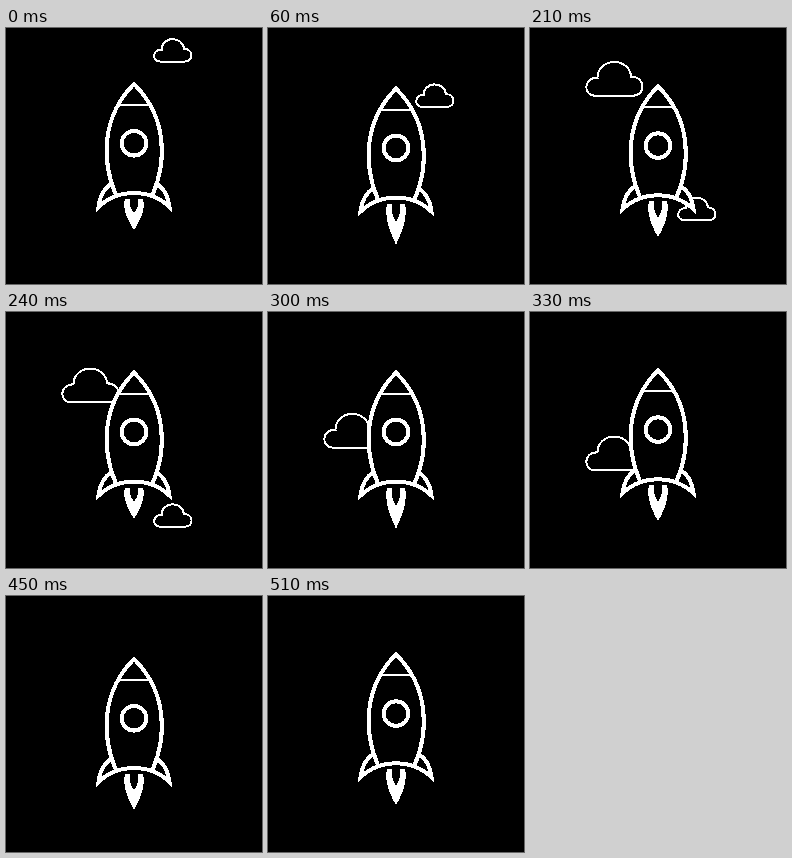
Animation of 256 by 256 pixels, one loop 540 ms. Source, as an HTML page:

```html
<!DOCTYPE html>
<html lang="en">
<head>
<meta charset="utf-8">
<title>Rocket</title>
<style>
  html, body { margin: 0; height: 100%; overflow: hidden; background: #000; }
  svg { display: block; width: 100vw; height: 100vh; fill: #000; stroke: #fff; stroke-width: 4; shape-rendering: crispEdges; }
</style>
</head>
<body>
<svg viewBox="0 0 256 256">
  <path id="near"/>
  <path id="far"/>
  <g id="rocket">
    <path id="flame" fill="#fff" stroke="none"
      d="M-9 0Q-12.5 12 0 31Q12.5 12 9 0H4.5Q5 8 0 14Q-5 8 -4.5 0Z"/>
    <path d="M106 155Q94 163 92.500 179Q107 165 128 165T163.500 179Q162 163 150 155"/>
    <path d="M110 167C95 132 96 88 128 56C160.500 88 161.500 132 146.500 167"/>
    <path d="M92.500 179Q107 165 128 165T163.500 179" fill="none"/>
    <path d="M112 77H144.500" stroke-width="2"/>
    <circle cx="128" cy="115.300" r="12.300"/>
  </g>
</svg>
<script>
  const STEP = 30, STEPS = 18, FALL = 22.65;
  const CLOUD = "M9 0C-3 0 -3 -18 11.5 -18A16.5 15 0 0 1 45 -19C60 -19 60 0 47 0Z";
  const [near, far, rocket, flame] =
    ["near", "far", "rocket", "flame"].map(id => document.getElementById(id));

  // Triangle wave from 0 up to 1 and back
  const bounce = (i, period) => 1 - Math.abs(1 - 2 * (i % period) / period);

  function placeCloud(cloud, i, first, last, x, y, scale) {
    cloud.style.display = i >= first && i <= last ? "" : "none";
    cloud.setAttribute("transform",
      `translate(${x} ${y + FALL * (i - first)}) scale(${scale})`);
  }

  function draw(now) {
    const i = Math.floor(now / STEP) % STEPS;
    placeCloud(far, i, 0, 9, 148, 33.5, 0.664);
    placeCloud(near, i, 6, 14, 56, 45, 1);
    rocket.setAttribute("transform", `translate(0 ${7 * bounce(i, 6)})`);
    flame.setAttribute("transform",
      `translate(128 171) scale(1 ${1 + 0.32 * bounce(i, 4)})`);
  }

  for (const cloud of [near, far]) {
    cloud.setAttribute("d", CLOUD);
    cloud.setAttribute("stroke-width", 2);
    cloud.setAttribute("vector-effect", "non-scaling-stroke");
  }

  const start = performance.now();
  function tick() {
    draw(performance.now() - start);
    requestAnimationFrame(tick);
  }
  tick();
</script>
</body>
</html>
```
